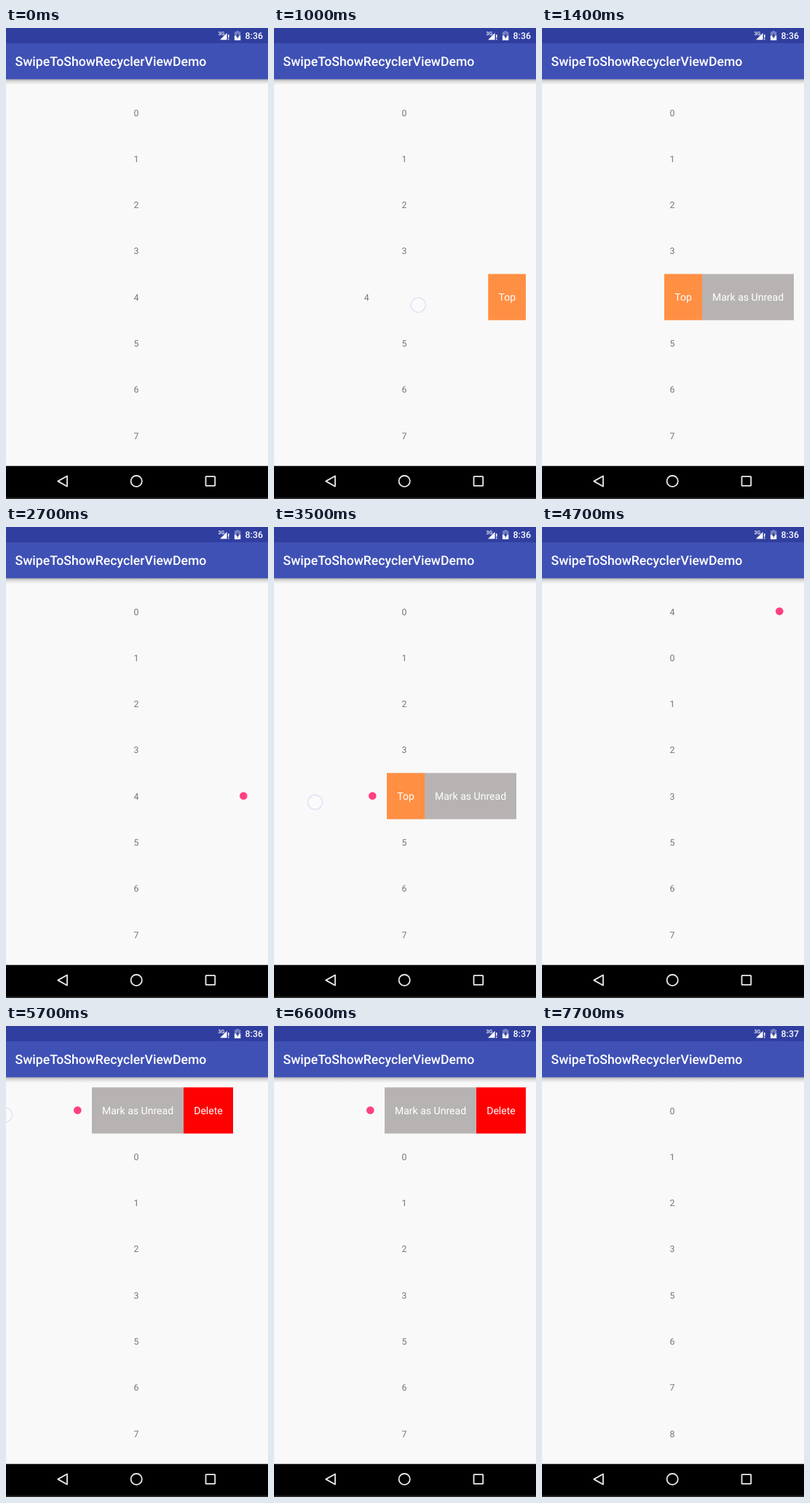
These frames come from a looping animation (360 px wide and 646 px high, 8000 ms). An HTML page:

```html
<!DOCTYPE html>
<html lang="en">
<head>
<meta charset="utf-8">
<title>Swipe list</title>
<style>
  html, body { margin: 0; height: 100%; overflow: hidden; background: #f9f9f9; }
  svg { display: block; width: 100vw; height: 100vh; font-family: Roboto, sans-serif; text-rendering: geometricPrecision; }
  .number { font-size: 12.3px; fill: #757575; text-anchor: middle; }
  .label { font-size: 14.05px; fill: #fff; text-anchor: middle; }
  .title { font-size: 17.65px; font-weight: 500; fill: #fff; }
  .clock { font-size: 12.4px; font-weight: 500; fill: #fff; text-anchor: end; }
  .nav { fill: none; stroke: #eaeaea; stroke-width: 1.8; stroke-linejoin: round; }
</style>
</head>
<body>
<svg viewBox="0 0 360 646">
  <defs>
    <linearGradient id="shade" x2="0" y2="1">
      <stop stop-color="#000" stop-opacity=".3"/>
      <stop offset=".45" stop-color="#000" stop-opacity=".11"/>
      <stop offset="1" stop-color="#000" stop-opacity="0"/>
    </linearGradient>
    <clipPath id="listClip"><path d="M14 70H346V601H14z"/></clipPath>
  </defs>
  <rect width="360" height="646" fill="#f9f9f9"/>
  <g id="list" clip-path="url(#listClip)"></g>
  <circle id="finger" r="10" fill="#fff" fill-opacity=".25" stroke="#d4d4f2" stroke-opacity=".65" stroke-width="1.4"/>

  <rect y="70" width="360" height="8" fill="url(#shade)"/>
  <rect y="21" width="360" height="49.3" fill="#3f51b5"/>
  <rect width="360" height="21" fill="#303f9f"/>
  <text class="title" x="12.6" y="52">SwipeToShowRecyclerViewDemo</text>
  <text x="291.5" y="9.5" font-size="7" font-weight="500" fill="#fff">3G</text>
  <path d="M294 16.2L303.5 6.7V16.2zM305 9h1.5v4.4H305zM305 14.7h1.5v1.5H305z" fill="#fff"/>
  <path d="M316.3 4h3.6v1.3h2.4V10.5h-8.4V5.3h2.4z" fill="#fff" fill-opacity=".35"/>
  <path d="M313.9 10.5h8.4V16.8h-8.4z" fill="#fff"/>
  <path d="M319 6.8L315.8 11.8H317.6V15.2L320.6 10.2H319z" fill="#303f9f"/>
  <text class="clock" id="clock" x="353" y="15.2">8:36</text>

  <rect y="600.7" width="360" height="45.3"/>
  <rect y="644" width="360" height="2" fill="#262626"/>
  <g class="nav">
    <path d="M71.3 621.6L84 614.5V628.7z"/>
    <circle cx="179.2" cy="621.6" r="7.6"/>
    <rect x="274.5" y="615.2" width="12.7" height="12.7" rx=".6"/>
  </g>
</svg>
<script>
const LOOP = 8000, TICK = 100, ROW = 63.3, TOP = 84.2, RIGHT = 346, SWIPED = 4;
const cells = {
  top: ['Top', 52, '#ff8f43'],
  unread: ['Mark as Unread', 126, '#b8b3b3'],
  remove: ['Delete', 68, '#f00']
};
// Each swipe drags past its resting offset, settles, and is ended by a tap.
const swipes = [
  { start: 900, peak: 1300, end: 1400, reach: 207, rest: 178, x: 250, y: 380, tap: 2300, tapX: 294, tapY: 371, close: 2433, menu: 0 },
  { start: 3200, peak: 3500, end: 3700, reach: 191, rest: 178, x: 247.5, y: 377.5, tap: 4300, tapX: 195, tapY: 370, close: 4433, menu: 0 },
  { start: 5500, peak: 5700, end: 5900, reach: 228, rest: 194, x: 226.5, y: 122, tap: 7100, tapX: 282, tapY: 118, close: 7313, menu: 1 }
];

const $ = id => document.getElementById(id);
const progress = (t, from, length) => Math.min(1, Math.max(0, (t - from) / length));
const ease = p => (1 - Math.cos(Math.PI * p)) / 2;
const move = (node, x, y) => node.setAttribute('transform', `translate(${x} ${y})`);
const show = (node, opacity) => node.setAttribute('opacity', opacity);

function add(parent, tag, attrs = {}, text = '') {
  const node = document.createElementNS('http://www.w3.org/2000/svg', tag);
  for (const key in attrs) node.setAttribute(key, attrs[key]);
  node.textContent = text;
  return parent.appendChild(node);
}

function addMenu(parent, names) {
  const menu = add(parent, 'g');
  let x = 0;
  for (const name of names) {
    const [label, width, fill] = cells[name];
    add(menu, 'rect', { x, width, height: ROW, fill });
    add(menu, 'text', { class: 'label', x: x + width / 2, y: 37 }, label);
    x += width;
  }
  return menu;
}

const rows = Array.from({ length: 9 }, (_, i) => {
  const row = add($('list'), 'g');
  const content = add(row, 'g');
  add(content, 'text', { class: 'number', x: 179, y: 36.4 }, i);
  return { row, content };
});
const { row: swipedRow, content } = rows[SWIPED];
const dot = add(content, 'circle', { cx: 326.3, cy: 31.4, r: 5.3, fill: '#ff4081' });
const menus = [['top', 'unread'], ['unread', 'remove']].map(names => addMenu(swipedRow, names));

function offset(s, t) {
  if (t < s.peak) return s.reach * progress(t, s.start, s.peak - s.start);
  const left = 1 - progress(t, s.peak, s.end - s.peak);
  return s.rest + (s.reach - s.rest) * left ** 3;
}

function drawSwipe(t) {
  const s = swipes.findLast(s => t >= s.start);
  const faded = ease(progress(t, 2433, 250));
  const removing = s && s.menu === 1;
  const open = s && (t < s.close || removing);
  const shift = s ? offset(s, t) : 0;

  move(content, open ? -shift : 0, 0);
  show(content, t >= 2433 ? faded : 1);
  show(dot, t >= 2433 ? 1 : 0);
  menus.forEach((menu, i) => {
    const opacity = s === swipes[0] ? 1 - faded : open ? 1 : 0;
    show(menu, s && s.menu === i ? opacity : 0);
    move(menu, RIGHT - shift, 0);
  });

  const dragging = s && t <= s.peak;
  const tapping = s && t >= s.tap && t < s.tap + 2 * TICK;
  show($('finger'), dragging || tapping ? 1 : 0);
  if (dragging) move($('finger'), s.x - shift, s.y);
  if (tapping) move($('finger'), s.tapX, s.tapY);
}

function draw(t) {
  const raised = ease(progress(t, 4433, 250));
  const closed = ease(progress(t, 7433, 250));
  rows.forEach(({ row }, i) => {
    const slot = i === SWIPED ? i * (1 - raised) : i - closed + (i < SWIPED ? raised : 0);
    move(row, 0, TOP + ROW * slot);
  });
  show(swipedRow, 1 - progress(t, 7313, 120));
  drawSwipe(t);
  $('clock').textContent = t < 6600 ? '8:36' : '8:37';
}

const began = performance.now();
function frame() {
  const t = (performance.now() - began) % LOOP;
  draw(Math.floor(t / TICK) * TICK);
  requestAnimationFrame(frame);
}
frame();
</script>
</body>
</html>
```
